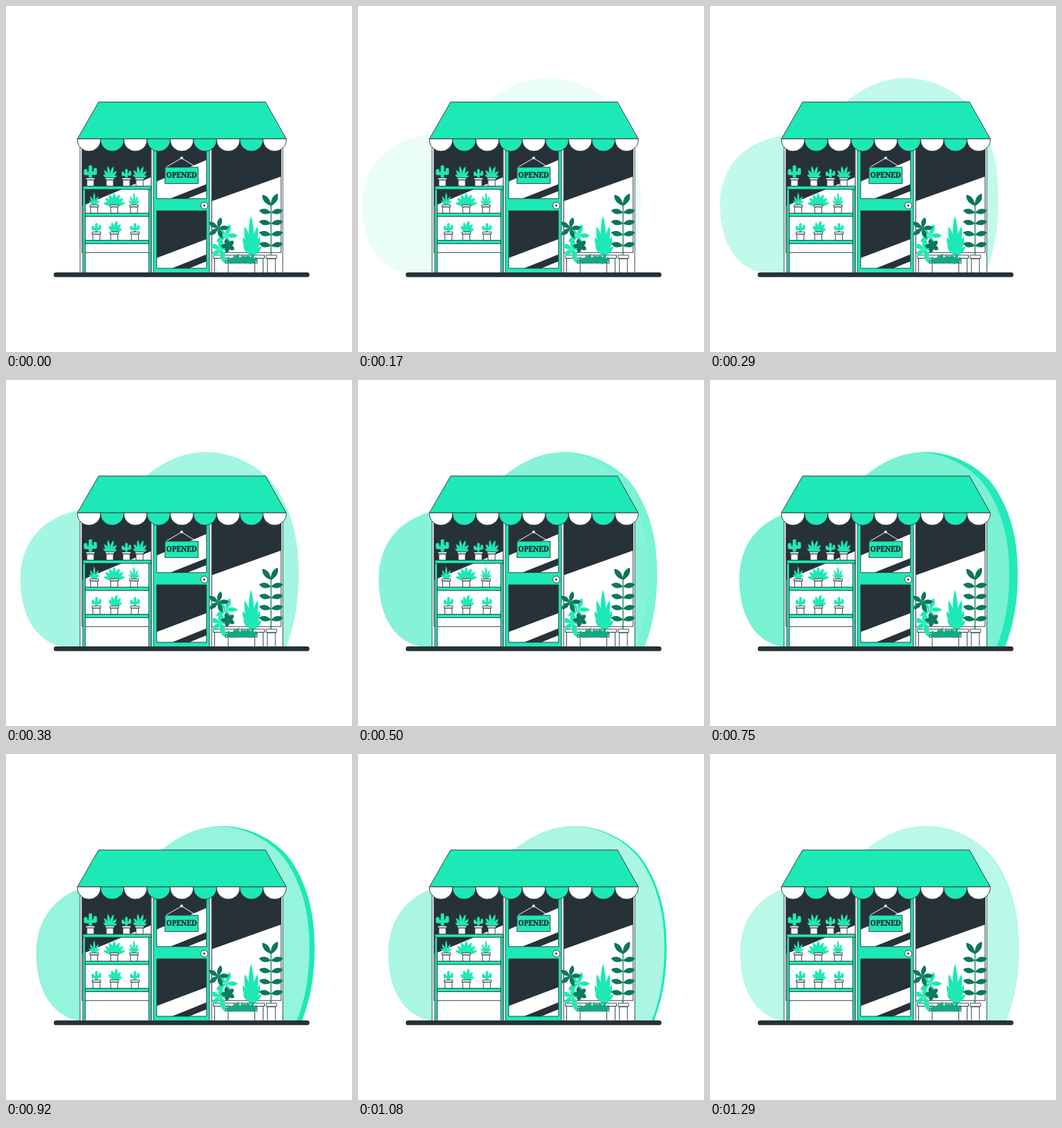
An HTML page for the animation above (1370 ms loop, 500x500 px).

```html
<!DOCTYPE html>
<html lang="en">
<head>
<meta charset="utf-8">
<style>
  html, body { margin: 0; width: 100%; height: 100%; overflow: hidden; background: #fff; }
  svg { display: block; width: 100%; height: 100%; }
  .g { fill: #1de9b6; }
  .d { fill: #263238; }
  .w { fill: #fff; }
  .line { stroke: #263238; stroke-width: .9; stroke-linejoin: round; }
</style>
</head>
<body>
<svg viewBox="0 0 500 500">
  <defs>
    <path id="blob" d="M107 386C62 378 43 335 43.6 285C45 230 80 196 134 187C176 180 200 158 226 138C250 118 280 104 312 104C352 104 394 126 414 157C438 195 446 235 446 280C446 320 440 355 427.5 386Z"/>
  </defs>
  <use id="base" href="#blob" class="g" opacity="0"/>
  <use id="tint" href="#blob" class="w" opacity="0"/>

  <!-- walls and windows -->
  <rect class="w line" x="107" y="192" width="293" height="194"/>
  <rect class="w line" x="109.8" y="192" width="100.2" height="164.3"/>
  <path class="d" d="M110 192H209.5V247.5L110 289Z"/>
  <rect class="w line" x="297.2" y="192" width="100.3" height="164.3"/>
  <path class="d" d="M297.5 192H397.3V246.5L297.5 282Z"/>

  <!-- door -->
  <rect class="w line" x="210" y="192" width="87.2" height="194"/>
  <rect class="g line" x="213" y="192" width="81" height="194"/>
  <rect class="w line" x="217.8" y="192" width="72" height="86.3"/>
  <path class="d" d="M218 192H289.6V222.5L218 253.5ZM238 278L289.6 257.5V267.5L263 278Z"/>
  <rect class="w line" x="217.8" y="296" width="72" height="83"/>
  <path class="d" d="M218 296H289.6V337L218 364ZM240 379L289.6 359V369L265 379Z"/>
  <circle class="w line" cx="286.6" cy="288.4" r="5"/>
  <circle class="d" cx="286.6" cy="288.4" r="1.4"/>
  <path d="M231 233L253.8 219.8L275 233" fill="none" stroke="#fff"/>
  <circle class="w" cx="253.8" cy="219.6" r="2"/>
  <rect class="g line" x="229.8" y="233" width="48" height="23.6"/>
  <text class="d" x="253.8" y="248.3" text-anchor="middle" font-family="'Noto Serif', serif" font-weight="900" font-size="10.4" stroke="#263238" stroke-width=".5">OPENED</text>

  <!-- shelf -->
  <g class="g line">
    <path d="M111 260.5H114.5V386H111ZM206.3 260.5H209.8V386H206.3Z"/>
    <path d="M111 260.3H209.8V265H111ZM114.5 299.3H206.3V304.2H114.5ZM114.5 338.6H206.3V343.5H114.5Z"/>
  </g>
  <g id="plants"></g>
  <g id="awning" class="line">
    <path class="g" d="M133.8 138.8H375L405 192H103.2Z"/>
  </g>
  <rect class="d" x="69" y="385" width="369.5" height="6.8" rx="3.4"/>
</svg>
<script>
const LIGHT = '#1de9b6', MID = '#16a884', DEEP = '#0e765c';
const byId = id => document.getElementById(id);
const plants = byId('plants');

function add(parent, tag, attrs) {
  const el = document.createElementNS('http://www.w3.org/2000/svg', tag);
  for (const key in attrs) el.setAttribute(key, attrs[key]);
  parent.append(el);
}

function leaf(x, y, fill, angle, length, width) {
  add(plants, 'path', {
    fill, transform: `translate(${x} ${y}) rotate(${angle})`,
    d: `M0 0C${-width} ${-length * .4} ${-width} ${-length * .7} 0 ${-length}C${width} ${-length * .7} ${width} ${-length * .4} 0 0`
  });
}

// Leaves spread evenly around the tilt; taper shortens the outer ones
function fan(x, y, fill, { count = 5, spread, length, width = 2.6, taper = 0, tilt = 0 }) {
  for (let i = 0; i < count; i++) {
    const side = 2 * i / (count - 1) - 1;
    leaf(x, y, fill, tilt + side * spread, length * (1 - taper * Math.abs(side)), width);
  }
}

const star = (x, y, fill, length, tilt) =>
  fan(x, y, fill, { spread: 144, length, width: 4.4, tilt });

function cactus(x, y, scale) {
  add(plants, 'path', {
    transform: `translate(${x} ${y}) scale(${scale})`, fill: 'none', stroke: LIGHT,
    'stroke-width': 5, 'stroke-linecap': 'round', 'stroke-linejoin': 'round',
    d: 'M0 1V-16.5M-7 -11V-7H0M0 -7.5H7V-12.5'
  });
}

function pot(x, top, bottom, rim, body, lip = 3) {
  add(plants, 'path', {
    class: 'w line',
    d: `M${x - body / 2} ${top + lip}h${body}V${bottom}h${-body}ZM${x - rim / 2} ${top}h${rim}v${lip}h${-rim}Z`
  });
}

const growers = {
  tall: (x, y) => cactus(x, y, 1),
  small: (x, y) => cactus(x, y, .73),
  aloe: (x, y) => fan(x, y, LIGHT, { count: 6, spread: 66, length: 20, taper: .45, tilt: 4 }),
  spiky: (x, y) => fan(x, y, LIGHT, { spread: 48, length: 19, width: 2, taper: .45 }),
  bushy: (x, y) => fan(x, y, LIGHT, { count: 7, spread: 78, length: 18, width: 3.4, taper: .1 }),
  broad: (x, y) => fan(x, y, LIGHT, { spread: 52, length: 18, width: 3.2, taper: .3, tilt: 12 })
};

function shelfRow(y, row) {
  for (const [kind, x] of row) {
    growers[kind](x, y - 11.3);
    pot(x, y - 12, y, 12.5, 10.2);
  }
}
shelfRow(260.3, [['tall', 122], ['aloe', 150], ['small', 174], ['aloe', 193]]);
shelfRow(299.3, [['spiky', 127.5], ['bushy', 156.5], ['spiky', 185]]);
shelfRow(338.6, [['small', 130.7], ['broad', 156.5], ['small', 186.3]]);

// Large planter
fan(355, 362, LIGHT, { spread: 24, length: 59, width: 5, taper: .48, tilt: -1 });
fan(356, 361, LIGHT, { count: 4, spread: 44, length: 24, width: 3.5, taper: .2 });
pot(336.5, 360, 386, 74, 70, 4.5);
star(318, 331.5, LIGHT, 17, 20);
star(309, 351, LIGHT, 15, 8);
leaf(318, 373, LIGHT, -28, 18, 4.4);
star(306.5, 321, DEEP, 16, 15);
star(321, 346.5, DEEP, 10.5, 50);

// Grass trough
pot(340.3, 368, 386, 45.5, 38.5, 3.5);
let seed = 7;
const random = () => (seed = seed * 16807 % 2147483647) / 2147483647;
for (let i = 0; i < 60; i++) {
  const side = random() * 2 - 1;
  leaf(340.5 + side * 15, 372.5, MID, side * 50 + random() * 50 - 25, 8 + random() * 7, 2);
}

// Tall plant
add(plants, 'path', { d: 'M383 284V361', stroke: DEEP, 'stroke-width': 1.3 });
fan(383, 289, DEEP, { count: 2, spread: 33, length: 20.5, width: 5.2, tilt: -5 });
for (let y = 298.5; y < 350; y += 16) fan(383, y, DEEP, { count: 2, spread: 80, length: 17.5, width: 5 });
pot(383.5, 360, 386, 15, 11.5, 5);

const scallop = 301.8 / 9;
for (let i = 0; i < 9; i++) add(byId('awning'), 'path', {
  class: i % 2 ? 'g' : 'w',
  d: `M${103.2 + i * scallop} 192h${scallop}v1.5a16.77 16.77 0 0 1 ${-scallop} 0Z`
});

const LOOP = 1370, STEP = 40, FIRST = 130, LAST = 1290;
const progress = (t, start, length) => Math.min(1, Math.max(0, (t - start) / length));

function place(id, x, opacity) {
  byId(id).setAttribute('transform', `translate(${x} 0)`);
  byId(id).setAttribute('opacity', opacity);
}

function draw(now) {
  const t = Math.min(LAST, FIRST + Math.floor((now % LOOP - FIRST) / STEP) * STEP);
  const slide = (1 + Math.cos(Math.PI * progress(t, -75, 900))) / 2;
  const rest = (1 - progress(t, 430, 950)) ** 2.1;
  place('base', -45 * slide, progress(t, 115, 640));
  place('tint', -30 * rest, .7 * (1 - rest));
}

const begin = performance.now();
function tick() {
  draw(performance.now() - begin);
  requestAnimationFrame(tick);
}
tick();
</script>
</body>
</html>
```
